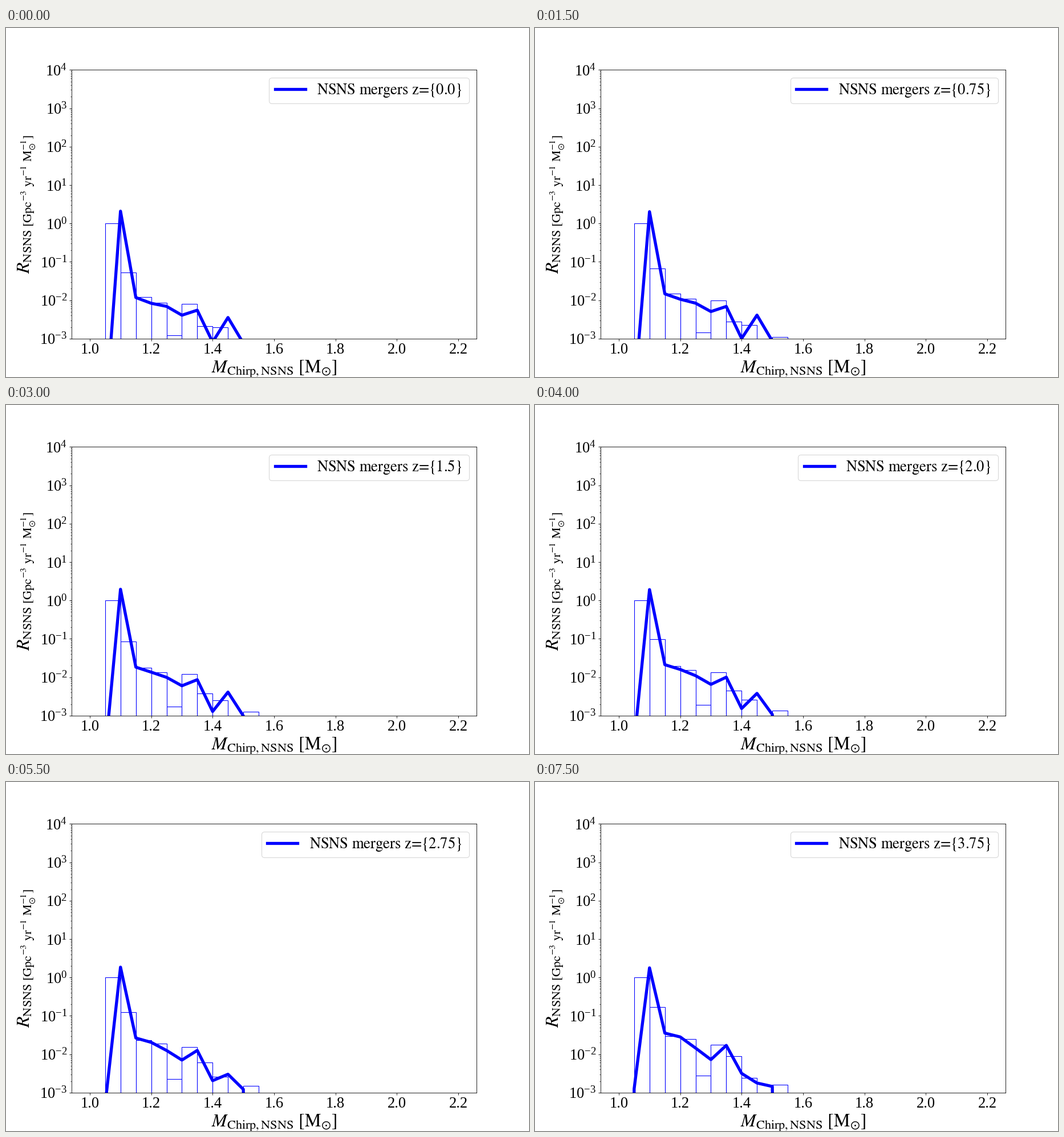
A matplotlib script that plays this animation: 917 by 611 pixels, repeating every 8000 ms.

```python
import matplotlib.pyplot as plt
import numpy as np
from matplotlib.animation import FuncAnimation
from matplotlib.patches import FancyBboxPatch
from matplotlib.transforms import Affine2D

W, H, DPI = 917, 611, 64
STEPS, INTERVAL = 16, 500
DZ = 0.25
BIN = 0.05
BLUE = "#0000ff"
FLOOR = 1e-40


def pt(size):
    """Scale a point size of a 12 x 8 inch figure to this stage."""
    return size * (W / 12) / DPI


# Chirp mass: first and last log10 value, and an optional bulge in between
BARS = {
    1.05: (0, 0),
    1.10: (-1.28, -0.77),
    1.15: (-1.91, -1.53),
    1.20: (-2.06, -1.60),
    1.25: (-2.91, -2.56),
    1.30: (-2.10, -1.75, 0.04),
    1.35: (-2.68, -2.05),
    1.40: (-2.70, -2.62, 0.07),
    1.50: (-3.03, -2.79, 0.03),
}
CURVE = {
    1.05: (-5.09, -2.90, 0.22),
    1.10: (0.32, 0.25),
    1.15: (-1.93, -1.45),
    1.20: (-2.08, -1.55),
    1.25: (-2.16, -1.84, 0.03),
    1.30: (-2.39, -2.14, 0.07),
    1.35: (-2.26, -1.77),
    1.40: (-3.09, -2.50, -0.04),
    1.45: (-2.45, -2.75, 0.19),
    1.50: (-3.12, -2.84),
}


def rate(s, first, last, bulge=0):
    return 10 ** (first + (last - first) * s + bulge * 4 * s * (1 - s))


def rates(spec, i):
    s = i / (STEPS - 1)
    return [rate(s, *keys) for keys in spec.values()]


plt.rcParams.update({
    "font.family": "Liberation Serif",
    "mathtext.fontset": "stix",
    "axes.linewidth": pt(0.8),
    "axes.labelsize": pt(30),
})
for axis in ("xtick", "ytick"):
    plt.rcParams.update({
        f"{axis}.labelsize": pt(25),
        f"{axis}.major.size": pt(3.5),
        f"{axis}.major.width": pt(0.8),
        f"{axis}.major.pad": pt(3.5),
        f"{axis}.minor.size": pt(2),
        f"{axis}.minor.width": pt(0.6),
    })

fig, ax = plt.subplots(figsize=(W / DPI, H / DPI), dpi=DPI)
ax.set_yscale("log")
bars = ax.bar(list(BARS), rates(BARS, 0), BIN, bottom=FLOOR, align="edge",
              fill=False, edgecolor=BLUE, linewidth=pt(1))
stroke = dict(color=BLUE, linewidth=pt(5), solid_capstyle="projecting")
curve, = ax.plot([1.0, *CURVE, 1.55], [FLOOR, *rates(CURVE, 0), FLOOR], **stroke)

ax.set_xlim(0.94, 2.26)
ax.set_ylim(1e-3, 1e4)
ax.set_xticks(np.arange(1.0, 2.3, 0.2))
ax.xaxis.set_major_formatter("{x:.1f}")
ax.set_xlabel(r"$M_{\rm Chirp,NSNS}\ \rm [M_{\odot}]$", labelpad=pt(3))
ax.set_ylabel(r"$R_{\rm NSNS\ [Gpc^{-3}\ yr^{-1}\ M_{\odot}^{-1}]}$", labelpad=pt(4))

# Legend in stage pixels (y up); its left side moves with the label's length
EM = 25 * W / 12 / 72
BOX_RIGHT, BOX_BOTTOM, BOX_HEIGHT = 812, 478.6, 45.8
BOX_WIDTH = 351
BASELINE = H - 115.8
pixels = Affine2D().scale(1 / DPI) + fig.dpi_scale_trans

box = FancyBboxPatch((0, BOX_BOTTOM), BOX_WIDTH, BOX_HEIGHT,
                     boxstyle=f"round,pad=0,rounding_size={0.2 * EM}",
                     facecolor="white", edgecolor="0.8", alpha=0.8,
                     linewidth=pt(1), transform=pixels, snap=True, zorder=5)
handle = plt.Line2D([], [], transform=pixels, zorder=6, **stroke)
ax.add_artist(box)
ax.add_artist(handle)
text = ax.text(0, BASELINE, "", transform=pixels, fontsize=pt(25), zorder=6)


def set_legend(z):
    extra_digits = len(str(z)) - len("0.0")
    width = BOX_WIDTH + extra_digits * EM / 2
    left = BOX_RIGHT - width
    start = left + 0.4 * EM
    box.set_x(left)
    box.set_width(width)
    handle.set_data([start, start + 2 * EM], [BASELINE + 0.35 * EM] * 2)
    text.set_x(start + 2.8 * EM - 1)
    text.set_text(r"$\text{NSNS mergers z=\{%s\}}$" % z)


def update(i):
    for bar, height in zip(bars, rates(BARS, i)):
        bar.set_height(height)
    curve.set_ydata([FLOOR, *rates(CURVE, i), FLOOR])
    set_legend(i * DZ)
    return [*bars, curve, box, handle, text]


anim = FuncAnimation(fig, update, frames=STEPS, interval=INTERVAL,
                     repeat=True, repeat_delay=0, blit=False)
plt.show()
```
